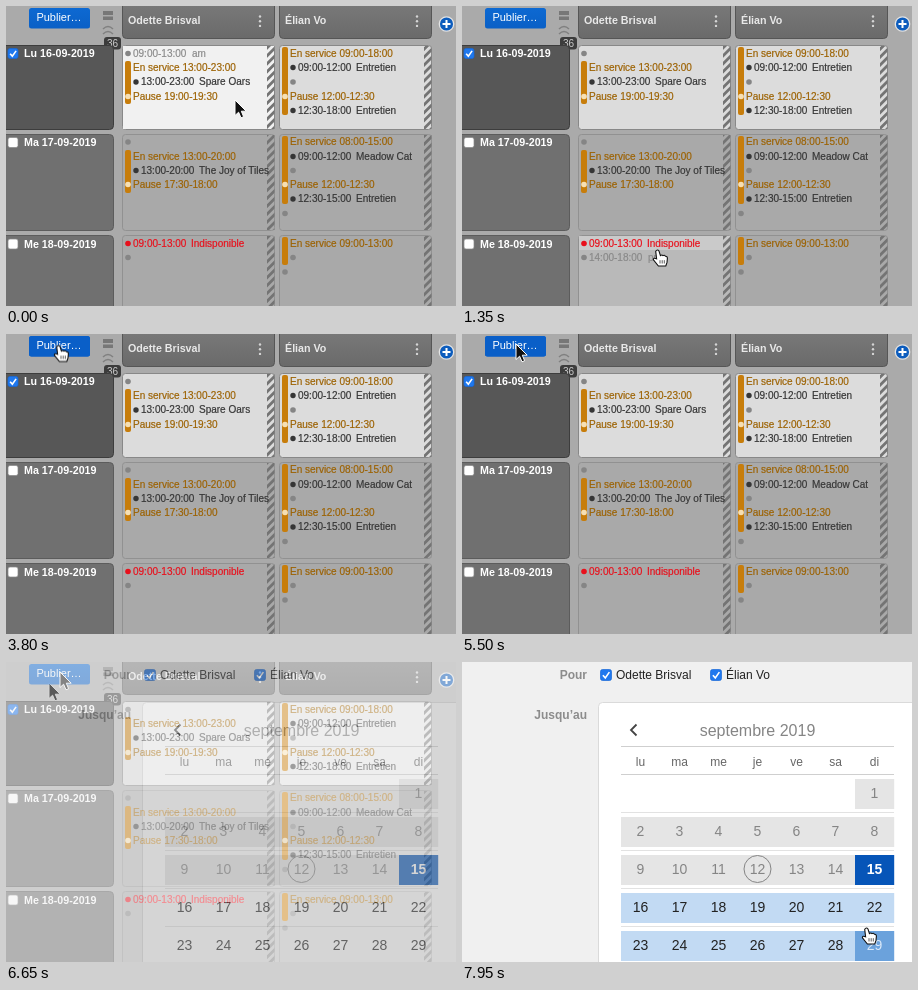
Animation, 450 px wide and 300 px high, one loop 8 s. Source, as an HTML page:

```html
<!DOCTYPE html>
<html lang="fr">
<head>
<meta charset="utf-8">
<title>Planning</title>
<style>
html, body { margin: 0; width: 100%; height: 100%; overflow: hidden; background: #aaa; }
svg { display: block; width: 100vw; height: 100vh; font: 10px "Liberation Sans", Arial, sans-serif; }
text { white-space: pre; }
.bold { font-weight: bold; font-size: 10.7px; fill: #fff; }
.label { font-weight: bold; font-size: 12px; fill: #8c8c8c; text-anchor: end; }
.name { font-size: 12px; fill: #222; }
.mid { text-anchor: middle; }
.weekday { font-size: 12px; fill: #666; }
.day { font-size: 14px; }
.entry { stroke-width: .2; }

.anim { animation: 8s linear infinite; }
#pointer { animation-name: roam; animation-timing-function: ease-in-out; }
#pointer .arrow { animation-name: roamArrow; animation-timing-function: step-end; }
#pointer .hand { animation-name: roamHand; animation-timing-function: step-end; }
#dialog { animation-name: appear; }
#picker { animation-name: pick; }
#picker .arrow { animation-name: pickArrow; animation-timing-function: step-end; }
#picker .hand { animation-name: pickHand; animation-timing-function: step-end; }
#am { animation-name: am; }
#pm { animation-name: pm; }
#monday { animation-name: monday; }
#wednesday { animation-name: wednesday; }
#neighbour { animation-name: neighbour; }
#rowRed { animation-name: rowRed; }
#rowPm { animation-name: rowPm; }
#press { animation-name: press; }
.lit { opacity: 0; animation: lit 8s linear infinite; }

@keyframes roam {
  0%, .6% { transform: translate(229px, 94px); }
  4.4%, 7.5% { transform: translate(262px, 218px); }
  16.5%, 18.1% { transform: translate(196px, 244px); }
  25.6%, 28.1% { transform: translate(321px, 267px); }
  29.4%, 31.2% { transform: translate(322px, 268px); }
  34%, 35% { transform: translate(203px, 251px); }
  41.2%, 41.9% { transform: translate(64px, 21px); }
  44.4%, 59.4% { transform: translate(53px, 11.5px); }
  61.2%, 100% { transform: translate(54px, 10px); }
}
@keyframes roamArrow { 0%, 25%, 37%, 60% { opacity: 1; } 12.5%, 32%, 43% { opacity: 0; } 100% { opacity: 1; } }
@keyframes roamHand { 0%, 25%, 37%, 60% { opacity: 0; } 12.5%, 32%, 43% { opacity: 1; } 100% { opacity: 0; } }
@keyframes am { 0%, 7.5% { opacity: 1; } 12%, 100% { opacity: 0; } }
@keyframes monday { 0%, 7.5% { opacity: 1; } 11%, 100% { opacity: 0; } }
@keyframes wednesday { 0%, 11% { opacity: 0; } 16%, 20% { opacity: 1; } 24%, 31.8% { opacity: 0; } 34%, 36.5% { opacity: 1; } 40%, 100% { opacity: 0; } }
@keyframes neighbour { 0%, 20% { opacity: 0; } 25%, 31.5% { opacity: 1; } 34%, 100% { opacity: 0; } }
@keyframes pm { 0%, 12.5% { opacity: 0; } 17%, 20% { opacity: .75; } 25%, 31.8% { opacity: 0; } 34%, 36.5% { opacity: 1; } 41%, 100% { opacity: 0; } }
@keyframes rowRed { 0%, 13.5% { opacity: 0; } 16%, 18.2% { opacity: 1; } 20%, 100% { opacity: 0; } }
@keyframes rowPm { 0%, 32% { opacity: 0; } 33.8%, 35.5% { opacity: 1; } 37.5%, 100% { opacity: 0; } }
@keyframes press { 0%, 42.5% { opacity: 0; } 44%, 46.8% { opacity: .5; } 47.5%, 68.8% { opacity: 1; } 70%, 100% { opacity: 0; } }
@keyframes appear { 0%, 72.4% { opacity: 0; } 93.1%, 100% { opacity: 1; } }
@keyframes pick {
  0%, 84% { transform: translate(43px, 21px); animation-timing-function: ease-in; }
  94.3% { transform: translate(150px, 70px); animation-timing-function: ease-out; }
  99%, 100% { transform: translate(405px, 266px); }
}
@keyframes pickArrow { 0% { opacity: 1; } 96.5%, 100% { opacity: 0; } }
@keyframes pickHand { 0% { opacity: 0; } 96.5%, 100% { opacity: 1; } }
@keyframes lit { 0% { opacity: .5; } .4%, 10% { opacity: 1; } 10.1%, 100% { opacity: 0; } }
</style>
</head>
<body>
<svg id="stage" viewBox="0 0 450 300"></svg>
<script>
const people = ['Odette Brisval', 'Élian Vo'];
const columns = [116, 273];
// glow lists the hover layers of each column's cell.
const rows = [
  { y: 39, h: 84, mid: 47, date: 'Lu 16-09-2019', on: true, glow: [[{ id: 'monday', fill: '#f1f1f1' }], []] },
  { y: 128, h: 96, mid: 136, date: 'Ma 17-09-2019', glow: [[], []] },
  { y: 229, h: 90, mid: 237.5, date: 'Me 18-09-2019', glow: [
    [{ id: 'wednesday', fill: '#b9b9b9' }, { id: 'rowRed', top: 1, h: 14, fill: '#cacaca' }, { id: 'rowPm', top: 15, h: 14, fill: '#c8c8c8' }],
    [{ id: 'neighbour', fill: '#b9b9b9' }]] }
];
const ink = '#363636', muted = '#858585', orange = '#9c6200', red = '#e8101c';

const range = (n, make) => Array.from({ length: n }, (_, i) => make(i)).join('');
const rect = (x, y, w, h, fill, more = '') =>
  `<rect x="${x}" y="${y}" width="${w}" height="${h}" fill="${fill}" ${more}/>`;
const dot = (x, y, r, fill, more = '') => `<circle cx="${x}" cy="${y}" r="${r}" fill="${fill}" ${more}/>`;
const line = (d, stroke, width = 1) => `<path d="${d}" fill="none" stroke="${stroke}" stroke-width="${width}"/>`;
const text = (x, y, s, cls = '', more = '') => `<text x="${x}" y="${y}" class="${cls}" ${more}>${s}</text>`;
const box = (x, y, size, on) =>
  rect(x + .5, y + .5, size - 1, size - 1, on ? '#1f78ee' : '#fff', `rx="2" stroke="${on ? '#1668d8' : '#888'}" stroke-width=".7"`) +
  (on ? line(`M${x + size * .24} ${y + size * .52}l${size * .2} ${size * .22}l${size * .34} ${-size * .48}`, '#fff', 1.6) : '');

// Schedule lines; y is the middle of the line.
const entry = (x, y, s, color) => text(x, y + 3.7, s, 'entry', `fill="${color}" stroke="${color}"`);
const duty = (x, y, s) => entry(x + 11, y, s, orange);
const pause = (x, y, s) => duty(x, y, 'Pause ' + s) + dot(x + 6, y + .5, 2.8, '#f6dfb3');
const task = (x, y, hours, title) =>
  dot(x + 14, y + .5, 2.7, ink) + entry(x + 19, y, hours, ink) + entry(x + 77, y, title, ink);
const spare = (x, y) => dot(x, y + .5, 2.8, muted);
const bar = (x, y1, y2) => rect(x + 3, y1, 6, y2 - y1, '#c77d0b', 'rx="2"');

const arrow = `<path class="arrow anim" d="M0 0V15.5L3.6 12.2L6 17.8L8.6 16.7L6.3 11.2H11.2Z" fill="#111" stroke="#fff"/>`;
const hand = `<g class="hand anim"><path d="M-2.3 1.3Q-.6-1 1 1L2.4 5.6Q3.8 4.3 5 5.6Q6.4 4.6 7.4 6.2Q9.2 6 9.4 8.4L9 12.4L7.8 16H.4L-4.6 9.8Q-4.8 7.2-1.4 8.8Z"
  fill="#fff" stroke="#111" stroke-width="1.1"/>${line('M2 10.2V13.5M4.2 10.2V13.5M6.3 10.2V13.5', '#333', .8)}</g>`;
const cursor = id => `<g id="${id}" class="anim">${arrow}${hand}</g>`;

const toolbar = () =>
  rect(23, 2, 61, 20.5, 'url(#blue)', 'rx="2.5"') +
  rect(23, 2, 61, 20.5, '#0a5fc8', 'id="press" class="anim" rx="2.5"') +
  text(53, 15, 'Publier…', 'mid', 'fill="#fff" style="font-size:11px"') +
  rect(97, 5, 10, 4, '#777') + rect(97, 10.5, 10, 3.5, '#777') +
  line('M97 23q5-5 10 0M97 28q5-5 10 0', '#808080', 1.5) +
  rect(98, 31, 17, 12.5, '#3c3c3c', 'rx="3"') + text(106.5, 40.5, '36', 'mid', 'fill="#ccc"') +
  columns.map((x, i) =>
    rect(x + .5, -5, 152, 37.5, 'url(#head)', 'rx="4" stroke="#565656"') +
    text(x + 6, 18.2, people[i], 'bold', 'style="fill:#e8e8e8"') +
    range(3, k => dot(x + 138, 10.5 + k * 4.7, 1.2, '#d5d5d5'))).join('') +
  dot(440.5, 18, 7.2, '#0c5cbd', 'stroke="#e4e4e4" stroke-width="1.3"') +
  line('M436.5 18h8M440.5 14v8', '#fff', 2);

const cell = (x, { y, h, on }, glow) =>
  rect(x + .5, y + .5, 152, h, on ? '#dcdcdc' : '#a9a9a9', `rx="3" stroke="${on ? '#888' : '#919191'}"`) +
  glow.map(({ id, fill, top = 1, h: height = h - 1 }) =>
    rect(x + 1, y + top, 151, height, fill, `id="${id}" class="anim"`)).join('') +
  rect(x + 145, y + 1, 7.5, h - 1, 'url(#hatch)');

const grid = () => rows.map(row =>
  rect(-4.5, row.y + .5, 112, row.h, row.on ? '#575757' : '#707070', `rx="4" stroke="${row.on ? '#3d3d3d' : '#5c5c5c'}"`) +
  box(1.5, row.mid - 5, 11, row.on) + text(18, row.mid + 4, row.date, 'bold') +
  columns.map((x, i) => cell(x, row, row.glow[i])).join('')).join('');

const schedule = ([a, b]) =>
  bar(a, 55, 98) + bar(a, 144, 187) + bar(b, 41, 109) + bar(b, 130, 198) + bar(b, 231, 259) +
  spare(a + 6, 47) + `<g id="am" class="anim">${entry(a + 11, 47, '09:00-13:00  am', '#8a8a8a')}</g>` +
  duty(a, 61, 'En service 13:00-23:00') + task(a, 75.5, '13:00-23:00', 'Spare Oars') + pause(a, 90, '19:00-19:30') +
  spare(a + 6, 135.5) + duty(a, 150, 'En service 13:00-20:00') +
  task(a, 164, '13:00-20:00', 'The Joy of Tiles') + pause(a, 178, '17:30-18:00') +
  dot(a + 6, 237.5, 2.8, red) + entry(a + 11, 237, '09:00-13:00', red) + entry(a + 69, 237, 'Indisponible', red) +
  spare(a + 6, 251) + `<g id="pm" class="anim">${entry(a + 11, 251, '14:00-18:00  pm', '#777')}</g>` +
  duty(b, 47, 'En service 09:00-18:00') + task(b, 61, '09:00-12:00', 'Entretien') + spare(b + 14, 75.5) +
  pause(b, 90, '12:00-12:30') + task(b, 104, '12:30-18:00', 'Entretien') +
  duty(b, 135.5, 'En service 08:00-15:00') + task(b, 150, '09:00-12:00', 'Meadow Cat') + spare(b + 14, 164) +
  pause(b, 178, '12:00-12:30') + task(b, 192.5, '12:30-15:00', 'Entretien') + spare(b + 6, 207) +
  duty(b, 237, 'En service 09:00-13:00') + spare(b + 14, 251) + spare(b + 6, 265.5);

// The range grows from the 16th to the day under the pointer.
const litAt = n => n < 22 ? 7750 : n === 22 ? 7800 : n < 29 ? 7850 : 7900;

function day(n) {
  const slot = n + 5, x = 159 + 39 * (slot % 7), y = 117 + 38 * Math.floor(slot / 7);
  const past = n < 15, today = n === 15, hover = n === 29;
  const label = (fill, more = '') => text(x + 19.5, y + 18.7, n, 'day mid', `fill="${fill}" ${more}`);
  const tile = fill => rect(x, y, 39.2, 30, fill);
  if (past) return tile('#e5e5e5') + label('#858585') + (n === 12 ? dot(x + 19.5, y + 14, 13.5, 'none', 'stroke="#858585"') : '');
  if (today) return tile('#0655b8') + label('#fff', 'font-weight="bold"');
  const lit = s => `<g class="lit" style="animation-delay:${litAt(n)}ms">${s}</g>`;
  return hover ? label('#222') + lit(tile('#6ba2dc') + label('#d9e8f8')) : lit(tile('#c2daf3')) + label('#222');
}

const dialog = () => `<g id="dialog" class="anim">` +
  rect(0, 0, 450, 300, '#f0f0f0') +
  text(125, 17, 'Pour', 'label') + text(125, 57, 'Jusqu’au', 'label') +
  box(138, 7, 12, true) + text(154, 17, people[0], 'name') +
  box(248, 7, 12, true) + text(264, 17, people[1], 'name') +
  rect(136.5, 40.5, 330, 280, '#fff', 'rx="4" stroke="#dadada"') +
  line('M174.5 62.5l-5.5 5.5l5.5 5.5', '#444', 1.8) +
  text(295.5, 74, 'septembre 2019', 'mid', 'fill="#858585" style="font-size:16px"') +
  line('M159 84.5h273M159 112.5h273', '#cfcfcf') +
  ['lu', 'ma', 'me', 'je', 've', 'sa', 'di'].map((d, i) => text(178.5 + 39 * i, 104, d, 'weekday mid')).join('') +
  range(4, i => line(`M159 ${150.5 + 38 * i}h273`, '#e2e2e2')) +
  range(29, i => day(i + 1)) + cursor('picker') + '</g>';

const gradient = (id, top, bottom) =>
  `<linearGradient id="${id}" x2="0" y2="1"><stop stop-color="${top}"/><stop offset="1" stop-color="${bottom}"/></linearGradient>`;

document.getElementById('stage').innerHTML =
  `<defs>${gradient('blue', '#0d69d2', '#0a60c6')}${gradient('head', '#7a7a7a', '#6a6a6a')}
  <pattern id="hatch" width="5.6" height="5.6" patternUnits="userSpaceOnUse" patternTransform="rotate(45)">${rect(0, 0, 2.8, 5.6, '#747474')}</pattern></defs>` +
  rect(0, 0, 450, 300, '#aaa') + toolbar() + grid() + schedule(columns) + cursor('pointer') + dialog();
</script>
</body>
</html>
```
